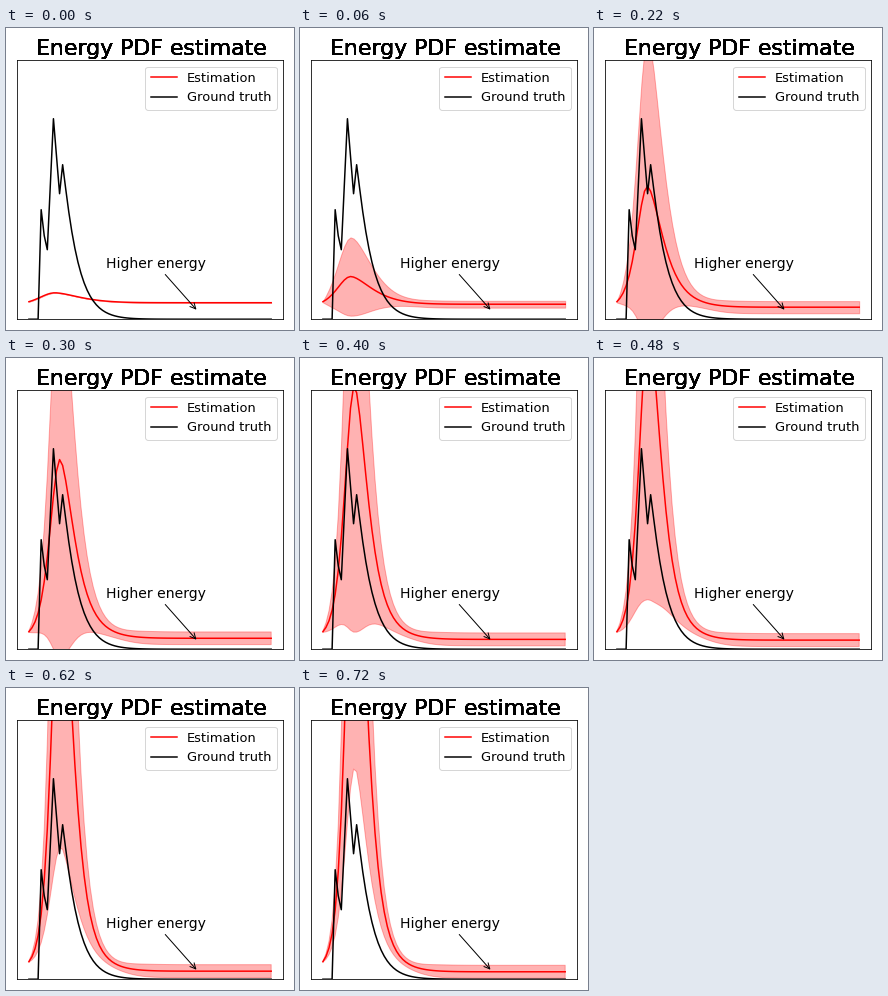
A matplotlib script for the animation above (0.74 s loop, 288 px wide and 302 px high).

```python
import matplotlib.pyplot as plt
import numpy as np
from matplotlib.animation import FuncAnimation

W, H, DPI = 288, 302, 72
LEFT, RIGHT, TOP, BOTTOM = 11.2, 277.2, 32.2, 291.2
FRAMES, INTERVAL = 37, 20

plt.rcParams["font.family"] = "DejaVu Sans"

# Axes data units are pixels: x from the stage's left, y up from the axes' bottom.
x = np.linspace(22.9, 265.2, 80)
START = 17.5


def ground_truth():
    """Three spikes followed by a smooth decay."""
    k = np.arange(len(x))
    spikes = np.interp(k, [3, 4, 5, 6, 8, 10, 11],
                       [0, 109.5, 83.5, 69.5, 200.5, 125.5, 154.5])
    decay = 154.5 * np.exp(-0.17 * np.maximum(k - 11, 0) ** 1.1)
    return np.where(k < 11, spikes, decay)


def bell(u, power=2):
    return np.exp(-np.abs(u) ** power / 2)


def estimate(t):
    """Mean and standard deviation of the estimate at step t."""
    ramp = 15.4 * t - 52
    peak = (ramp + np.hypot(ramp, 91)) / 2
    floor = 16.5 / (1 + 0.034 * t)
    d = x - (55 - 6 * np.exp(-t / 8))
    rising = d < 0

    # Bump in log space: steep rise, longer tail.
    edge = bell(d[0] / 17)
    rise = (bell(d / 17) - edge) / (1 - edge)
    fall = bell(d / 25, 1.65)
    mean = np.where(rising,
                    START * (peak / START) ** rise,
                    floor * (peak / floor) ** fall)

    # Spread follows the mean near the bump and levels off to the right.
    ratio = np.where(rising, 1 - 0.96 * (d / d[0]) ** 2, bell(d / 30))
    std = (1.38 - 0.0222 * t) * (1 - np.exp(-t / 2.5)) * ratio * mean
    level = 6.5 * (1 - np.exp(-t / 4))
    std += np.where(rising, 0, level * (1 - np.exp(-(d / 65) ** 4)))
    return mean, std


fig = plt.figure(figsize=(W / DPI, H / DPI), dpi=DPI, facecolor="white")
ax = fig.add_axes([LEFT / W, 1 - BOTTOM / H,
                   (RIGHT - LEFT) / W, (BOTTOM - TOP) / H])
ax.set(xlim=(LEFT, RIGHT), ylim=(0, BOTTOM - TOP), xticks=[], yticks=[])

band = ax.fill_between(x, START, START, color="red", alpha=0.3)
mean_line, = ax.plot(x, x, color="red", lw=1.5, label="Estimation")
ax.plot(x, ground_truth(), color="black", lw=1.5, label="Ground truth")
ax.legend(loc="upper right", fontsize=13)
ax.annotate("Higher energy", xy=(191.8, 8), xytext=(100, 51.2), fontsize=14,
            arrowprops=dict(arrowstyle="->"))

# Stacked copies harden the title's soft edges.
for _ in range(8):
    ax.text(145.2, BOTTOM - 27, "Energy PDF estimate", fontsize=22,
            ha="center", va="baseline")


def update(t):
    mean, std = estimate(t)
    mean_line.set_ydata(mean)
    xs = np.concatenate([x, x[::-1]])
    ys = np.concatenate([mean + std, (mean - std)[::-1]])
    band.set_verts([np.column_stack([xs, ys])])
    return band, mean_line


anim = FuncAnimation(fig, update, frames=FRAMES, interval=INTERVAL,
                     repeat=True, repeat_delay=0, blit=False)
plt.show()
```
